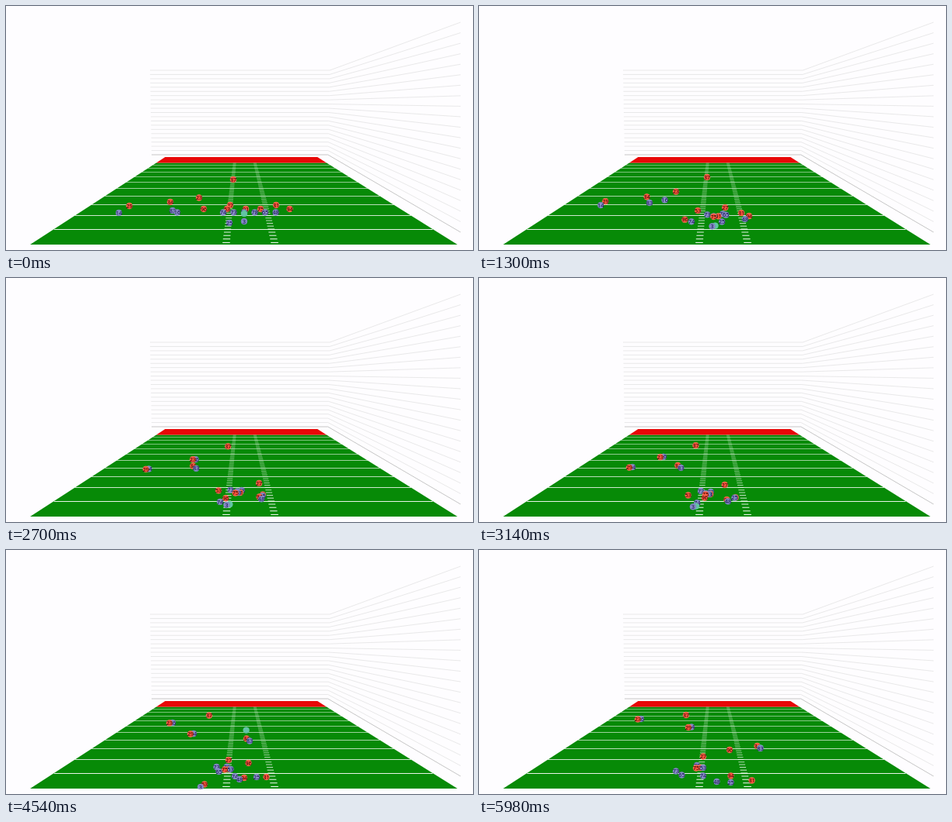
Animation, 600 px wide and 315 px high, one loop 6000 ms. Source, as an HTML page with a canvas:

```html
<!DOCTYPE html>
<html lang="en">
<head>
<meta charset="utf-8">
<title>Play tracking</title>
<style>
html, body { margin: 0; width: 100%; height: 100%; overflow: hidden; background: #fefdff; }
canvas { display: block; width: 600px; height: 315px; }
</style>
</head>
<body>
<canvas id="stage"></canvas>
<script>
const W = 600, H = 315, LOOP = 6000;
const dpr = window.devicePixelRatio || 1;

function sized(canvas) {
  canvas.width = W * dpr;
  canvas.height = H * dpr;
  const c = canvas.getContext('2d');
  c.scale(dpr, dpr);
  return c;
}
const ctx = sized(document.getElementById('stage'));
const backdrop = document.createElement('canvas');

// Perspective of the field: vanishing height and the two side lines
const HORIZON = 132.3, YARD = 0.000162, FIRST = 1 / 155.7;
const TOP = 195, GOAL = 202.4, BOTTOM = 308;
const leftX = y => 31 + (BOTTOM - y) * 1.535;
const rightX = y => 580 - (BOTTOM - y) * 1.592;
const yardY = n => HORIZON + 1 / (FIRST + n * YARD);

function line(c, color, width, ...pts) {
  c.strokeStyle = color;
  c.lineWidth = width;
  c.beginPath();
  for (let i = 0; i < pts.length; i += 2) c.lineTo(pts[i], pts[i + 1]);
  c.stroke();
}

function band(c, color, y0, y1) {
  c.fillStyle = color;
  c.beginPath();
  c.moveTo(leftX(y0), y0);
  c.lineTo(rightX(y0), y0);
  c.lineTo(rightX(y1), y1);
  c.lineTo(leftX(y1), y1);
  c.fill();
}

function drawStadium(c) {
  c.fillStyle = '#fefdff';
  c.fillRect(0, 0, W, H);

  for (let i = 0; i <= 20; i++) {
    const y = 83 + i * 5.45;
    line(c, i < 20 ? '#dedede' : '#a8a8a8', 0.65,
      185 + i * 0.1, y, 416 - i * 0.12, y, 584, 21 + i * 13.55);
  }

  band(c, '#078a07', GOAL, BOTTOM);
  band(c, '#e80808', TOP, GOAL);

  for (let n = 0; n <= 45; n += 5) {
    const y = yardY(n), s = (y - HORIZON) / 155;
    line(c, `rgba(255,255,255,${0.9 * s})`, 1, leftX(y), Math.floor(y) + 0.5, rightX(y), Math.floor(y) + 0.5);
  }
  for (let n = -4; n < 49; n++) {
    const y = yardY(n), s = (y - HORIZON) / 173;
    for (const x of [301 - 18 * s, 302.5 + 42.5 * s]) {
      line(c, `rgba(255,255,255,${0.9 * s})`, 1.15 * s, x - 4.8 * s, y, x + 4.8 * s, y);
    }
  }
}

const mix = (a, b, u) => a + (b - a) * u;
const blend = (p, q, u) => [mix(p[0], q[0], u), mix(p[1], q[1], u)];
const shift = (p, dx, dy) => [p[0] + dx, p[1] + dy];
const progress = (t, from, to) => Math.max(0, Math.min(1, (t - from) / (to - from)));
const smooth = (t, from, to) => {
  const u = progress(t, from, to);
  return u * u * (3 - 2 * u);
};

// Smooth route through four points: set, drop, throw, finish
const MOMENTS = [0, 2200, 4540, 5980];
function route(...pts) {
  const slope = (i, k) => (pts[i + 1][k] - pts[i][k]) / (MOMENTS[i + 1] - MOMENTS[i]);
  const tangent = (i, k) => {
    if (i === 0) return slope(0, k) / 2;
    if (i === 3) return slope(2, k);
    const a = MOMENTS[i] - MOMENTS[i - 1], b = MOMENTS[i + 1] - MOMENTS[i];
    return (slope(i - 1, k) * b + slope(i, k) * a) / (a + b);
  };
  return t => {
    const i = t < MOMENTS[1] ? 0 : t < MOMENTS[2] ? 1 : 2;
    const d = MOMENTS[i + 1] - MOMENTS[i];
    const u = progress(t, MOMENTS[i], MOMENTS[i + 1]);
    return [0, 1].map(k => {
      const p = pts[i][k], q = pts[i + 1][k];
      const m = tangent(i, k) * d, n = tangent(i + 1, k) * d;
      return p + u * (m + u * (3 * (q - p) - 2 * m - n + u * (2 * (p - q) + m + n)));
    });
  };
}

// A defender closes in on his man and then stays at his side
const cover = (man, start, side) => {
  const [x, y] = man(0);
  const gap = [start[0] - x, start[1] - y];
  return t => shift(man(t), ...blend(gap, side, smooth(t, 0, 2900)));
};

// Linemen lock up in the pocket and turn around its middle
const pocket = route([308, 267], [302, 275], [285, 283], [283, 281]);
const engage = (start, dx, dy, swing) => t => {
  const spot = shift(pocket(t), dx + swing * Math.cos(Math.PI * t / LOOP), dy);
  return blend(start, spot, smooth(t, 0, 1300));
};

const onLine = i => [279 + i * 13.5, 266.5];
const quarterback = route([306, 278], [291, 290], [250, 306], [240, 325]);
const outside = route([145, 267], [171, 249.5], [241, 237], [273, 228.5]);
const slot = route([214, 264], [231, 247.5], [313, 246.5], [361.5, 256]);
const inside = route([220, 266.5], [247, 238.5], [214, 223], [208, 218]);

const offence = {
  3: quarterback,
  14: outside,
  83: slot,
  16: inside,
  25: route([287, 280], [327.5, 279], [322, 293], [323.5, 300]),
  74: route(onLine(0), [271.5, 286.5], [294, 292], [288, 291.5]),
  73: route(onLine(1), [291.5, 272], [270.5, 280], [253, 285.5]),
  53: engage(onLine(2), 0, 0, -5),
  78: engage(onLine(3), 3, -3, 6),
  65: route(onLine(4), [304, 273], [273.5, 286], [260.5, 290.5]),
  48: route(onLine(5), [335, 282], [300, 296], [305.5, 299])
};

const defence = {
  29: cover(outside, [158.5, 258], [-4, 0.5]),
  34: cover(slot, [211, 253], [-4, -3]),
  23: cover(inside, [248, 247.5], [-4, 0.4]),
  37: route([292, 224], [290.5, 218.5], [261, 213.5], [266, 213]),
  27: route([288, 257], [329.5, 263], [286, 271], [288, 266.5]),
  31: route([347, 257], [331, 275.5], [334.5, 293], [350.5, 297.5]),
  53: route([284, 262], [277, 269], [255, 302.5], [247, 324]),
  94: route([364.5, 262], [333, 278.5], [306, 294], [323.5, 291.5]),
  96: route([254, 262], [275, 283.5], [311.5, 275], [322, 258]),
  91: engage([308, 262], 2, 0, 0),
  75: engage([327, 262], -4, 0.5, 0)
};

// The ball is snapped, held, thrown in an arc and caught
const RELEASE = 3900, CATCH = 5650, LIFT = 54;
const held = t => blend(onLine(2), shift(quarterback(t), 4, -0.7), smooth(t, 0, 1100));
function ball(t) {
  if (t < RELEASE) return shift(held(t), 0, 1.5 * (1 - smooth(t, 0, 1100)));
  if (t > CATCH) return shift(slot(t), 0, -0.5);
  const a = held(RELEASE), b = slot(CATCH), u = progress(t, RELEASE, CATCH);
  return [mix(a[0], b[0], 1 - (1 - u) ** 1.6), mix(a[1], b[1], u) - 4 * LIFT * u * (1 - u)];
}

const RED = { fill: '#f9523a', edge: '#ff8068', text: '#1c0000' };
const BLUE = { fill: '#888dc8', edge: '#777cc0', text: '#08083c' };
const TEAL = { fill: '#62c4a4', edge: '#62c4a4' };
const squad = (style, routes) =>
  Object.entries(routes).map(([label, pos]) => ({ style, label, pos }));
const pieces = [...squad(RED, defence), ...squad(BLUE, offence), { style: TEAL, label: '', pos: ball }];

function drawPiece({ style, label, at: [x, y] }) {
  ctx.beginPath();
  ctx.arc(x, y, 3.9, 0, Math.PI * 2);
  ctx.fillStyle = style.fill;
  ctx.fill();
  ctx.strokeStyle = style.edge;
  ctx.lineWidth = 0.6;
  ctx.stroke();
  ctx.fillStyle = style.text || style.fill;
  ctx.fillText(label, x, y + 2.7);
}

function draw(t) {
  ctx.drawImage(backdrop, 0, 0, W, H);
  ctx.save();
  ctx.beginPath();
  ctx.rect(0, 0, W, BOTTOM + 0.5);
  ctx.clip();
  ctx.font = '400 7.5px "Open Sans", sans-serif';
  ctx.textAlign = 'center';
  pieces
    .map(p => ({ ...p, at: p.pos(t) }))
    .sort((a, b) => a.at[1] - b.at[1])
    .forEach(drawPiece);
  ctx.restore();
}

drawStadium(sized(backdrop));
const start = performance.now();
function frame() {
  draw((performance.now() - start) % LOOP);
  requestAnimationFrame(frame);
}
frame();
</script>
</body>
</html>
```
